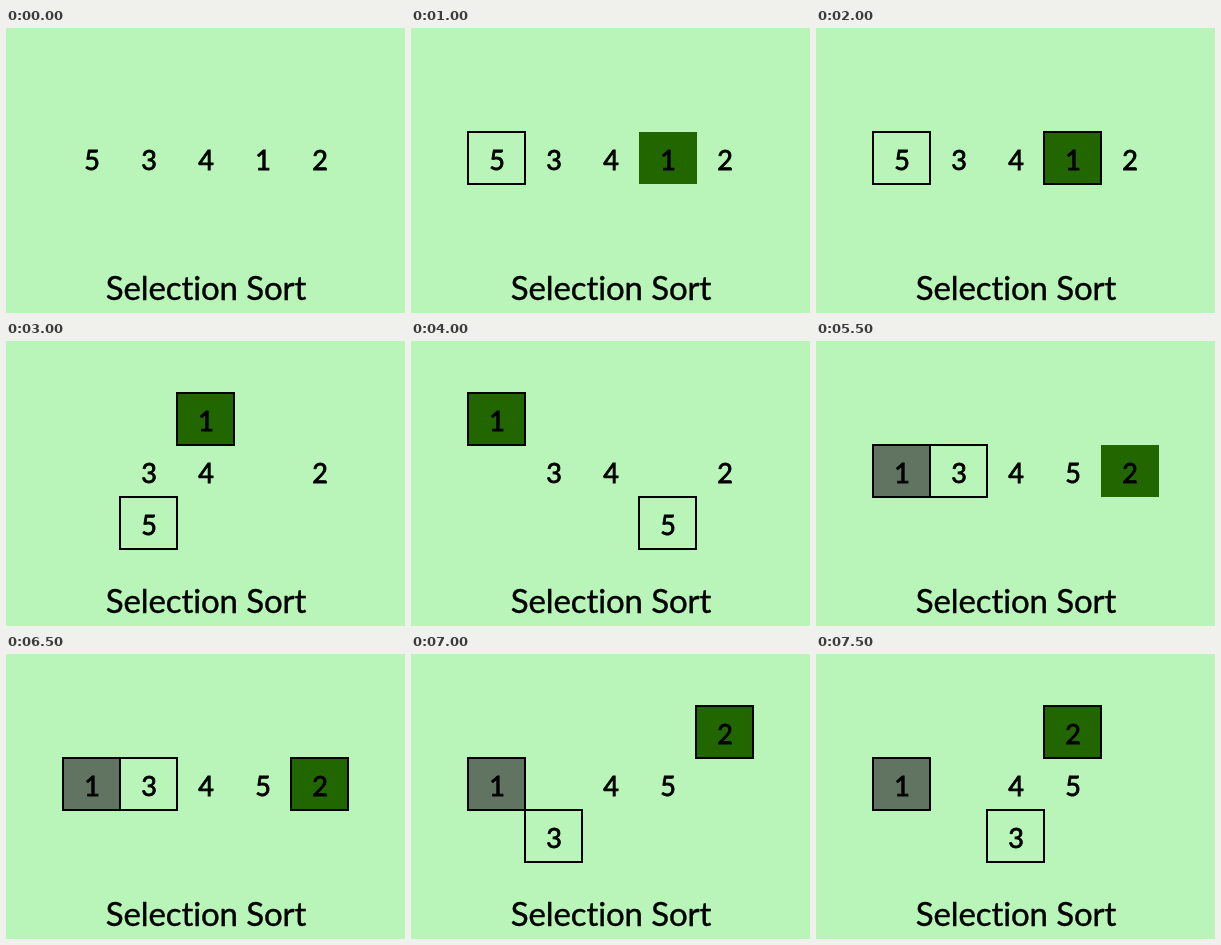
Animation, 399 px wide and 285 px high, one loop 8 s. Source, as an HTML page with a canvas:

```html
<!DOCTYPE html>
<html lang="en">
<head>
<meta charset="utf-8">
<title>Selection Sort</title>
<style>
html, body { margin: 0; width: 100%; height: 100%; overflow: hidden; background: #b9f5b9; }
canvas { display: block; }
</style>
</head>
<body>
<canvas id="stage" width="399" height="285"></canvas>
<script>
const ctx = document.getElementById('stage').getContext('2d');
const STEP = 500, STEPS = 16;
const PITCH = 57, LEFT = 86, MID = 130, RISE = 52;
const GREEN = '#226600', GRAY = '#617461';

// Each round: box the slot, fill the minimum, outline it, swap, settle.
const rounds = [
  { start: 1, slot: 0, min: 3, order: [5, 3, 4, 1, 2] },
  { start: 10, slot: 1, min: 4, order: [1, 3, 4, 5, 2] }
];

function text(str, x, y, size, weight) {
  ctx.font = size + 'px Lato, Carlito, sans-serif';
  ctx.letterSpacing = '-0.1px'; // also turns ligatures off
  ctx.fillStyle = ctx.strokeStyle = '#000';
  ctx.lineWidth = weight;
  ctx.fillText(str, x, y);
  ctx.strokeText(str, x, y);
}

function cell(value, col, row, fill, border) {
  const x = LEFT + col * PITCH, y = MID + row * RISE;
  if (fill) {
    ctx.fillStyle = fill;
    ctx.fillRect(x - 29, y - 26, 58, 52);
  }
  if (border) {
    ctx.strokeStyle = '#000';
    ctx.lineWidth = 2;
    ctx.strokeRect(x - 29, y - 26, 57, 52);
  }
  text(value, x, y + 12, 27, 0.8);
}

function draw(step) {
  ctx.fillStyle = '#b9f5b9';
  ctx.fillRect(0, 0, 399, 285);
  ctx.textAlign = 'center';
  ctx.lineJoin = 'miter';

  const round = step < rounds[1].start ? rounds[0] : rounds[1];
  const { slot, min, order } = round;
  const phase = step - round.start;
  const span = min - slot;
  const moved = Math.max(0, Math.min(phase - 4, span));
  const lifted = phase >= 4 && phase <= 4 + span ? 1 : 0;

  order.forEach((value, i) => {
    if (i < slot) cell(value, i, 0, GRAY, true);
    else if (i === slot) cell(value, i + moved, lifted, null, phase >= 0);
    else if (i === min) cell(value, i - moved, -lifted, phase >= 1 ? GREEN : null, phase >= 2);
    else cell(value, i, 0, null, false);
  });
  text('Selection Sort', 200, 272, 33, 0.4);
}

function frame(now) {
  draw(Math.floor(now / STEP) % STEPS);
  requestAnimationFrame(frame);
}
draw(0);
requestAnimationFrame(frame);
</script>
</body>
</html>
```
